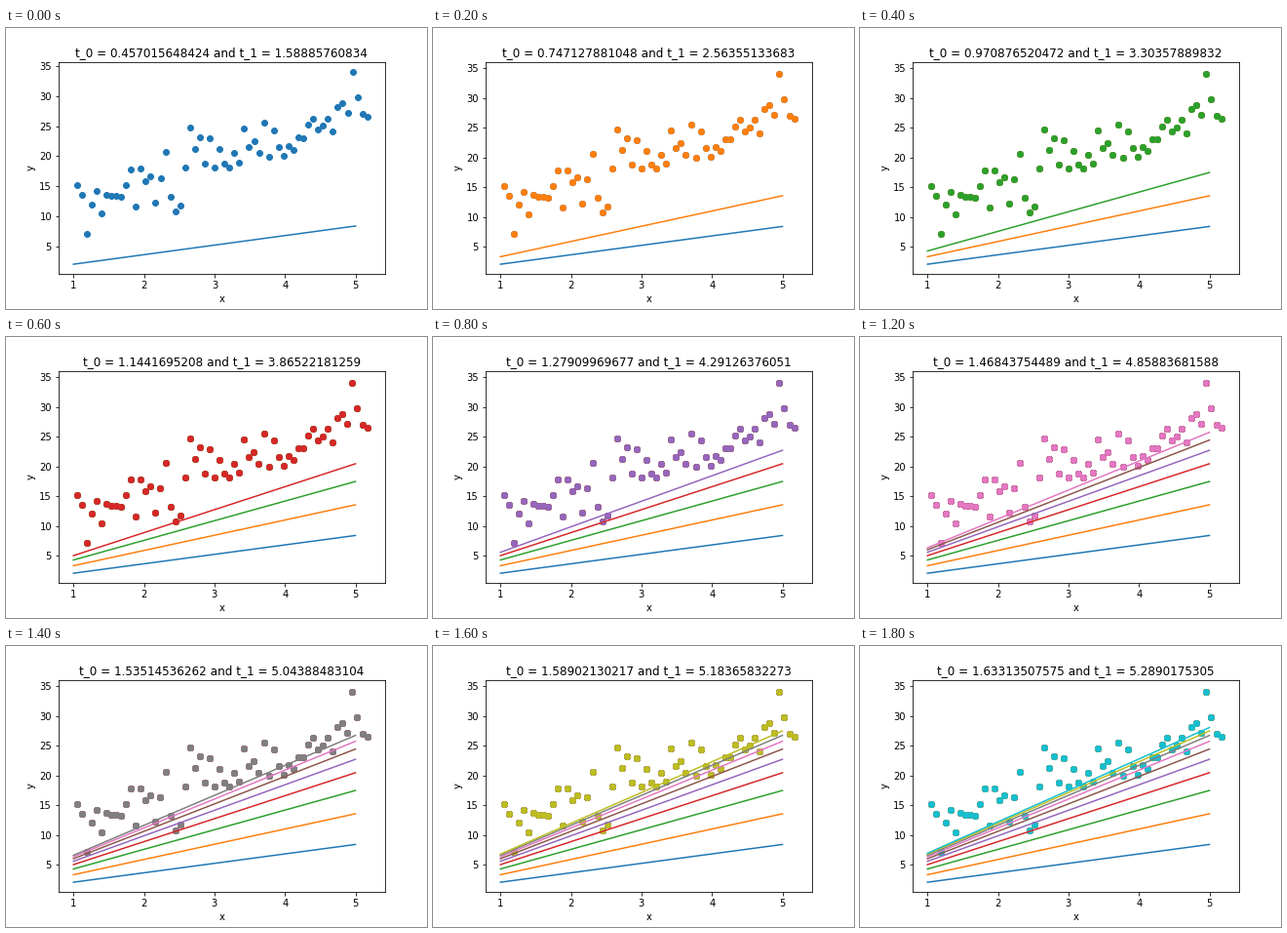
A matplotlib script that plays this animation: 432x288 px, repeating every 2 s.

```python
import matplotlib.pyplot as plt
import numpy as np
from matplotlib.animation import FuncAnimation

STEPS = 10
RATE = 0.02
RADIUS = 3      # marker radius in pixels
MARGIN = 0.05

# Noisy samples of y = 4x + 7
np.random.seed(10)
x = np.array([i * np.pi / 180 for i in range(60, 300, 4)])
y = 4 * x + 7 + np.random.normal(0, 3, len(x))


def descend(t0, t1):
    """One gradient step of the least-squares fit."""
    err = t0 + t1 * x - y
    return t0 - RATE * err.mean(), t1 - RATE * (err * x).mean()


def view(lo, hi):
    pad = MARGIN * (hi - lo)
    return lo - pad, hi + pad


fits = [(0.457015648424, 1.58885760834)]
while len(fits) < STEPS:
    fits.append(descend(*fits[-1]))

fig = plt.figure(figsize=(6, 4), dpi=72, facecolor="white")
fig.subplots_adjust(left=0.125, right=0.9, bottom=0.125, top=0.88)
ax = fig.add_subplot()
ax.set_xlabel("x")
ax.set_ylabel("y")
ax.xaxis.set_major_locator(plt.MultipleLocator(1))
ax.yaxis.set_major_locator(plt.MultipleLocator(5))
title = ax.set_title("")

ends = np.array([1, 5])
layers = []
for k, (t0, t1) in enumerate(fits):
    line, = ax.plot(ends, t0 + t1 * ends, color=f"C{k}")
    dots = ax.scatter(x, y, s=(2 * RADIUS) ** 2, color=f"C{k}")
    layers.append((line, dots))


def grow(lo, hi, top, pixels):
    """Widen a data range so a marker at its top fits the current view."""
    low, high = view(lo, hi)
    return max(hi, top + RADIUS * (high - low) / pixels)


# The view settles over the first steps, as each scatter adds its marker size
width, height = 432 * 0.775, 288 * 0.755
x_lo, x_hi = ends
y_lo, y_hi = sum(fits[0]), fits[0][0] + 5 * fits[0][1]
views = []
for _ in fits:
    x_hi = grow(x_lo, x_hi, x.max(), width)
    y_hi = grow(y_lo, y_hi, y.max(), height)
    views.append((view(x_lo, x_hi), view(y_lo, y_hi)))


def draw(i):
    for k, layer in enumerate(layers):
        for artist in layer:
            artist.set_visible(k <= i)
    ax.set_xlim(views[i][0])
    ax.set_ylim(views[i][1])
    title.set_text("t_0 = {:.12g} and t_1 = {:.12g}".format(*fits[i]))


anim = FuncAnimation(fig, draw, frames=STEPS, init_func=lambda: draw(0),
                     interval=200, repeat=True, repeat_delay=0)
plt.show()
```
